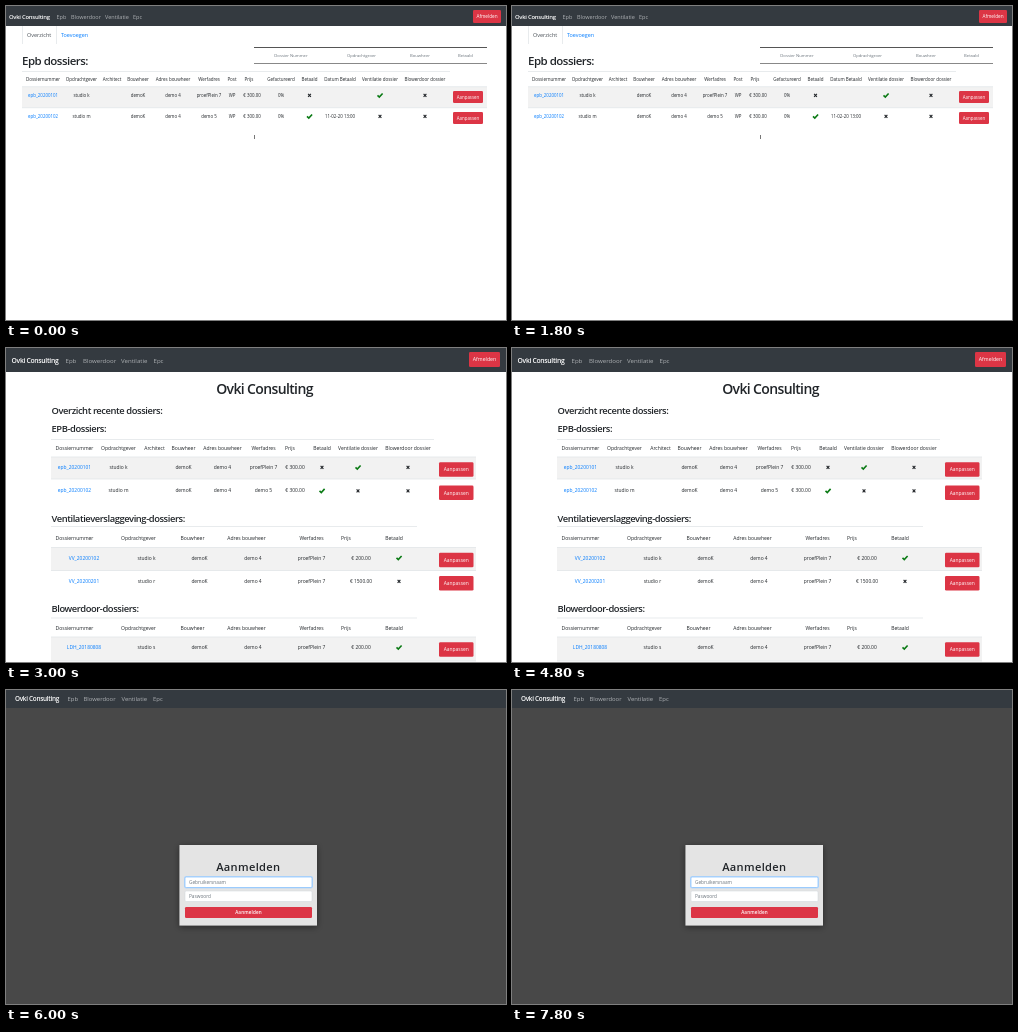
An HTML page for the animation above (9000 ms loop, 500x314 px).

```html
<!DOCTYPE html>
<html lang="nl">
<head>
<meta charset="utf-8">
<title>Dossiers</title>
<style>
  html, body { margin: 0; width: 100%; height: 100%; overflow: hidden; background: #fff; }
  svg { display: block; width: 100vw; height: 100vh; }
  text { font-family: "Open Sans", "Noto Sans", sans-serif; white-space: pre; }
  .title { font-weight: 600; letter-spacing: -.045em; }
  .wide { font-weight: 600; letter-spacing: .03em; }
  .scene { visibility: hidden; animation: show 9s step-end infinite; }
  #home { animation-delay: -6s; }
  #login { animation-delay: -3s; }
  @keyframes show {
    0% { visibility: visible; }
    33.3333%, 100% { visibility: hidden; }
  }
</style>
</head>
<body>
<svg viewBox="0 0 500 314" preserveAspectRatio="none">
  <defs>
    <filter id="shadow" x="-20%" y="-20%" width="140%" height="140%">
      <feDropShadow dx="0" dy="1.5" stdDeviation="3" flood-color="#000" flood-opacity=".45"/>
    </filter>
  </defs>
  <g id="list" class="scene"></g>
  <g id="home" class="scene"></g>
  <g id="login" class="scene"></g>
</svg>
<script>
const BRAND = 'Ovki Consulting';
const DARK = '#343a40', RED = '#dc3545', BLUE = '#007bff', GREEN = '#0a7a14', INK = '#212529', LINE = '#dee2e6';

const rect = (x, y, w, h, fill, extra = '') =>
  `<rect x="${x}" y="${y}" width="${w}" height="${h}" fill="${fill}" ${extra}/>`;
const text = (s, x, y, size, { fill = INK, cls = '', anchor = 'start' } = {}) =>
  `<text x="${x}" y="${y}" font-size="${size}" class="${cls}" text-anchor="${anchor}" fill="${fill}">${s}</text>`;
const mid = (s, x, y, size, opts = {}) => text(s, x, y, size, { ...opts, anchor: 'middle' });
const title = (s, x, y, size) => text(s, x, y, size, { cls: 'title' });
const line = (x1, x2, y, color = LINE, w = .7) =>
  `<path d="M${x1} ${y}H${x2}" stroke="${color}" stroke-width="${w}"/>`;
const button = (label, x, y, w, h, size, cls) =>
  rect(x, y, w, h, RED, 'rx="1.3"') + mid(label, x + w / 2, y + h / 2 + size * .36, size, { fill: '#fff', cls });
const cross = (x, y) =>
  `<path d="M${x - 1.4} ${y - 1.5}l2.8 3m0-3l-2.8 3" stroke="${INK}" stroke-width="1.1" fill="none"/>`;
const check = (x, y) =>
  `<path d="M${x - 2.5} ${y + .1}l1.8 1.7l3.3-3.6" stroke="${GREEN}" stroke-width="1.6" fill="none"/>`;

// A cell is plain text, or x (cross), or v (check).
function cell(s, x, y, size, fill) {
  if (s === 'x') return cross(x, y - 1.6);
  if (s === 'v') return check(x, y - 1.7);
  return mid(s, x, y, size, { fill });
}
const cells = (row, xs, y, size) =>
  row.map((s, i) => s && cell(s, xs[i], y, size, i ? INK : BLUE)).join('');
const heads = (names, xs, y, size) => names.map((s, i) => mid(s, xs[i], y, size)).join('');

function navbar(h, y, brandX, brandSize, linkXs, linkSize) {
  const links = ['Epb', 'Blowerdoor', 'Ventilatie', 'Epc'];
  return rect(0, 0, 500, h, DARK) + text(BRAND, brandX, y, brandSize, { fill: '#fff', cls: 'title' }) +
    links.map((s, i) => text(s, linkXs[i], y, linkSize, { fill: '#adb0b3' })).join('');
}

function list() {
  const xs = [37, 75.5, 106, 132, 167, 203, 226, 243, 275, 303.5, 334, 374, 419];
  const cols = xs.map((x, i) => i === 7 ? 246 : x);
  const names = ['Dossiernummer', 'Opdrachtgever', 'Architect', 'Bouwheer', 'Adres bouwheer', 'Werfadres', 'Post',
    'Prijs', 'Gefactureerd', 'Betaald', 'Datum Betaald', 'Ventilatie dossier', 'Blowerdoor dossier'];
  const rows = [
    ['epb_20200101', 'studio k', '', 'demoK', 'demo 4', 'proefPlein 7', 'WP', '€ 300.00', '0%', 'x', '', 'v', 'x'],
    ['epb_20200102', 'studio m', '', 'demoK', 'demo 4', 'demo 5', 'WP', '€ 300.00', '0%', 'v', '11-02-20 13:00', 'x', 'x'],
  ];
  const filters = [['Dossier Nummer', 285], ['Opdrachtgever', 355.5], ['Bouwheer', 414], ['Betaald', 459.5]];
  return rect(0, 0, 500, 314, '#fff') +
    navbar(20, 13, 3, 5.9, [50.5, 65, 99, 127], 5.5) +
    button('Afmelden', 467, 4, 28, 13, 4.7) +
    `<path d="M16.5 20V38M50.5 20V38" stroke="${LINE}" stroke-width=".7"/>` +
    text('Overzicht', 21, 31, 5.5, { fill: '#495057' }) +
    text('Toevoegen', 55, 31, 5.4, { fill: BLUE }) +
    title('Epb dossiers:', 16, 59.3, 11.5) +
    line(248, 481, 41.5, '#555', 1) + line(248, 481, 57.5, '#888', 1) +
    filters.map(([s, x]) => mid(s, x, 51, 4.2, { fill: '#6c757d' })).join('') +
    line(16, 444, 65.5) + rect(16, 81, 465, 20.5, '#f2f2f2') + line(16, 481, 80.7) + line(16, 481, 101.7) +
    heads(names, xs, 74.5, 4.5) +
    rows.map((r, i) => cells(r, cols, 91 + 21 * i, 4.4) +
      button('Aanpassen', 447, 85 + 21 * i, 30, 12, 4.4)).join('') +
    rect(248, 129, .8, 4, '#555');
}

function block(name, titleY, top, width, headY, [y0, y1], names, xs, cols, rows) {
  const step = 23.4;
  return title(name, 45.5, titleY, 9.4) + line(45, width, top) +
    rect(45, y0, 425, y1 - y0, '#f2f2f2') + line(45, 470, y0) + line(45, 470, y1) +
    heads(names, xs, headY, 5) +
    rows.map((r, i) => cells(r, cols, y0 + 12 + step * i, 4.9) +
      button('Aanpassen', 433, y0 + 5.2 + step * i, 34.5, 14.5, 4.9)).join('');
}

function home() {
  const epbNames = ['Dossiernummer', 'Opdrachtgever', 'Architect', 'Bouwheer', 'Adres bouwheer', 'Werfadres',
    'Prijs', 'Betaald', 'Ventilatie dossier', 'Blowerdoor dossier'];
  const epbXs = [68.5, 112.5, 148.5, 177.5, 216.5, 257.5, 284, 316, 352, 402];
  const epbCols = epbXs.map((x, i) => i === 6 ? 289 : x);
  const names = [...epbNames.slice(0, 2), ...epbNames.slice(3, 8)];
  const xs = [68.5, 132.5, 186.5, 240.5, 305.5, 340, 388];
  const cols = [78, 140.5, 193.5, 247, 305.5, 355, 393];
  return rect(0, 0, 500, 314, '#fff') +
    navbar(24, 15, 5.5, 6.8, [59.5, 77, 115, 147.5], 6.1) +
    button('Afmelden', 463, 4, 31, 15, 5.2) +
    mid(BRAND, 258.5, 46.2, 14, { cls: 'title' }) +
    title('Overzicht recente dossiers:', 45.5, 66, 9.4) +
    block('EPB-dossiers:', 84.4, 91.5, 428, 102, [109, 131], epbNames, epbXs, epbCols, [
      ['epb_20200101', 'studio k', '', 'demoK', 'demo 4', 'proefPlein 7', '€ 300.00', 'x', 'v', 'x'],
      ['epb_20200102', 'studio m', '', 'demoK', 'demo 4', 'demo 5', '€ 300.00', 'v', 'x', 'x'],
    ]) +
    block('Ventilatieverslaggeving-dossiers:', 174, 178.5, 411, 191.5, [199.5, 222.5], names, xs, cols, [
      ['VV_20200102', 'studio k', 'demoK', 'demo 4', 'proefPlein 7', '€ 200.00', 'v'],
      ['VV_20200201', 'studio r', 'demoK', 'demo 4', 'proefPlein 7', '€ 1500.00', 'x'],
    ]) +
    block('Blowerdoor-dossiers:', 264.2, 270, 411, 281.5, [289, 313], names, xs, cols, [
      ['LDH_20180808', 'studio s', 'demoK', 'demo 4', 'proefPlein 7', '€ 200.00', 'v'],
    ]);
}

function login() {
  const hint = { fill: '#6c757d' };
  return rect(0, 0, 500, 314, '#484848') +
    navbar(18, 11.3, 9, 6.4, [61.5, 77.5, 115.5, 147], 5.9) +
    rect(173.5, 155, 137.5, 80.5, '#e4e4e4', 'filter="url(#shadow)"') +
    mid('Aanmelden', 242.3, 181.3, 11.1, { cls: 'wide' }) +
    rect(178, 186, 129, 12.5, '#bcd9f8', 'rx="1.8"') +
    rect(179, 187, 127, 10.5, '#fff', 'rx="1.2" stroke="#80bdff" stroke-width=".7"') +
    rect(179, 201, 127, 10.5, '#fff', 'rx="1.2" stroke="#ced4da" stroke-width=".5"') +
    text('Gebruikersnaam', 183, 194, 4.75, hint) +
    text('Paswoord', 183, 208, 4.75, hint) +
    button('Aanmelden', 179, 217, 127, 11, 4.6, 'wide');
}

for (const scene of [list, home, login]) document.getElementById(scene.name).innerHTML = scene();
</script>
</body>
</html>
```
